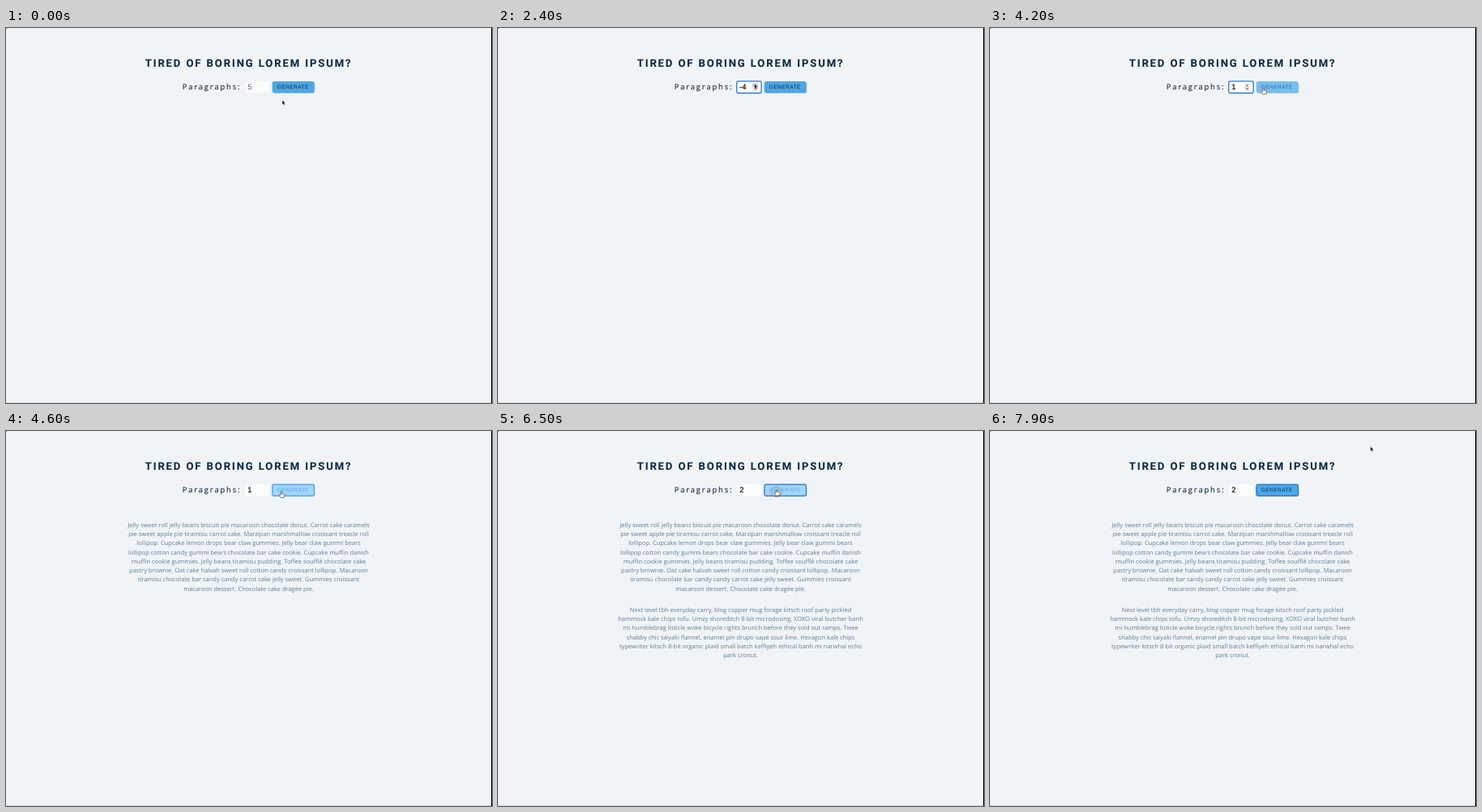
These frames come from a looping animation (600x464 px, 8 s). An HTML page:

```html
<!DOCTYPE html>
<html lang="en">
<head>
<meta charset="utf-8">
<title>Paragraph generator</title>
<style>
  html, body { margin: 0; width: 100%; height: 100%; overflow: hidden; background: #f0f4f7; }
  svg { display: block; width: 600px; height: 464px; }
  text { text-rendering: geometricPrecision; white-space: pre; }
  .title { font: 700 13.125px Roboto, sans-serif; letter-spacing: 1.875px; fill: #102a42; stroke: #102a42; stroke-width: .12px; }
  .label { font: 9.375px "Open Sans", sans-serif; letter-spacing: 1.875px; fill: #102a42; stroke: #102a42; stroke-width: .12px; }
  .value { font: 9.375px "Liberation Sans", Arial, sans-serif; stroke-width: .2px; }
  .caption { font: 6.56px "Liberation Sans", Arial, sans-serif; letter-spacing: .45px; }
  .lorem { font: 7.5px "Open Sans", sans-serif; fill: #617d98; text-anchor: middle; }
</style>
</head>
<body>
<svg viewBox="0 0 600 464">
  <rect width="600" height="464" fill="#f0f4f7"/>
  <path d="M0 0H1.5L0 1.5Z" fill="#777"/>
  <rect y="463" width="600" height="1" fill="#d3d7da"/>
  <rect x="599" width="1" height="464" fill="#000"/>

  <text class="title" x="171.7" y="48.2">TIRED OF BORING LOREM IPSUM?</text>
  <text class="label" x="217.7" y="76.2">Paragraphs:</text>

  <rect x="295" y="66" width="30" height="14.3" rx="1.9" fill="#fbfcfc"/>
  <rect id="inputRing" x="294.7" y="65.9" width="30.4" height="14.6" rx="1.8" fill="#fff" stroke="#2f74cf" stroke-width="1.3"/>
  <text id="value" class="value" x="298.2" y="76.3"></text>
  <rect id="caret" x="307.2" y="68.5" width=".6" height="9.5" fill="#333"/>
  <g id="spinner">
    <rect x="314" y="68.5" width="7" height="9.2" rx="1" fill="#e6e8ea"/>
    <rect id="half" x="314" width="7" height="4.6" rx="1" fill="#c4c7cb"/>
    <path d="M316 71.7L317.5 69.9L319 71.7ZM316 74.6L317.5 76.4L319 74.6Z" fill="#555"/>
  </g>

  <rect x="329.1" y="66.7" width="52.2" height="14.4" rx="3" fill="#000" opacity=".2"/>
  <rect id="button" x="328.7" y="66" width="52" height="14.3" rx="2.8"/>
  <rect id="buttonRing" x="328.9" y="66.1" width="51.6" height="14.2" rx="1.8" fill="none" stroke-width="1.2"/>
  <text id="caption" class="caption" x="334.7" y="75.4">GENERATE</text>

  <g id="lorem0" class="lorem"></g>
  <g id="lorem1" class="lorem"></g>

  <g id="cursor">
    <path id="arrow" d="M0 0V6L1.4 4.8L2.4 7L3.5 6.5L2.6 4.5H4.4Z" fill="#111" stroke="#fff" stroke-width=".5"/>
    <g id="hand">
      <circle id="ripple" cx="0" cy="3.5" r="6.4" fill="none" stroke="#b98784" stroke-width=".8"/>
      <path d="M-.7 4.6V.6Q0 -.4 .7 .6V3L3.4 3.6Q4.2 4 4 5.2L3.3 8H-.8L-2.9 5Q-3 3.8 -1.9 4.1Z" fill="#f4f4f4" stroke="#444" stroke-width=".65" stroke-linejoin="round"/>
    </g>
  </g>
</svg>
<script>
const $ = id => document.getElementById(id);

const paragraphs = [
  [118.8, `Jelly sweet roll jelly beans biscuit pie macaroon chocolate donut. Carrot cake caramels
pie sweet apple pie tiramisu carrot cake. Marzipan marshmallow croissant treacle roll
lollipop. Cupcake lemon drops bear claw gummies. Jelly bear claw gummi bears
lollipop cotton candy gummi bears chocolate bar cake cookie. Cupcake muffin danish
muffin cookie gummies. Jelly beans tiramisu pudding. Toffee soufflé chocolate cake
pastry brownie. Oat cake halvah sweet roll cotton candy croissant lollipop. Macaroon
tiramisu chocolate bar candy candy carrot cake jelly sweet. Gummies croissant
macaroon dessert. Chocolate cake dragée pie.`],
  [223.8, `Next level tbh everyday carry, blog copper mug forage kitsch roof party pickled
hammock kale chips tofu. Umzy shoreditch 8-bit microdosing, XOXO viral butcher banh
mi humblebrag listicle woke bicycle rights brunch before they sold out ramps. Twee
shabby chic taiyaki flannel, enamel pin drupo vape sour lime. Hexagon kale chips
typewriter kitsch 8-bit organic plaid small batch keffiyeh ethical banh mi narwhal echo
park cronut.`]
];
paragraphs.forEach(([top, copy], i) => {
  $('lorem' + i).innerHTML = copy.split('\n')
    .map((line, n) => `<text x="299.5" y="${top + n * 11.25}">${line}</text>`).join('');
});

// time, x, y of the pointer's tip
const path = [
  [0, 341, 89], [100, 341, 89], [400, 317.2, 76.5], [2100, 317.2, 76.5],
  [2400, 316.5, 69], [3800, 316.5, 69], [4300, 340, 74.5], [5400, 340, 74.5],
  [5600, 316.5, 69], [5800, 316.5, 69], [6000, 329, 60], [6300, 344, 72],
  [7600, 344, 72], [7900, 469.5, 19], [8000, 469.5, 19]
];
// time, number shown in the field
const counts = [
  [0, 5], [400, 4], [500, 3], [600, 2], [700, 1], [800, 0], [1000, -1],
  [1200, -2], [1400, -3], [1600, -4], [1800, -5], [2400, -4], [2700, -3],
  [2900, -2], [3200, -1], [3400, 0], [3700, 1], [5800, 2]
];

const clamp = v => Math.max(0, Math.min(1, v));
const show = (id, on) => $(id).setAttribute('visibility', on ? 'inherit' : 'hidden');
const set = (id, name, v) => $(id).setAttribute(name, v);
const mix = (a, b, k) => `rgb(${a.map((v, i) => v + (b[i] - v) * k)})`;

function pointer(t) {
  const i = path.findIndex(p => p[0] > t);
  const [a, b] = [path[i - 1], path[i]];
  const k = (t - a[0]) / (b[0] - a[0]), e = k * k * (3 - 2 * k);
  return [a[1] + (b[1] - a[1]) * e, a[2] + (b[2] - a[2]) * e];
}

const fade = (t, from, to) => clamp((t - from) / 200) * (1 - clamp((t - to) / 200));

function draw(t) {
  const [x, y] = pointer(t);
  const within = (l, r) => x >= l && x <= r && y >= 66 && y <= 80.5;
  const overInput = within(295, 325), overButton = within(328.7, 381);
  const focused = t >= 300 && t < 4600 || t >= 5800 && t < 6400;
  const buttonFocused = t >= 4600 && !focused;
  const hover = Math.max(fade(t, 4100, 5500), fade(t, 6100, 7600));

  show('inputRing', focused);
  const count = counts.filter(c => c[0] <= t).pop()[1];
  $('value').textContent = count;
  const ink = t < 300 ? '#5a5f64' : '#0c0c0c';
  set('value', 'fill', ink);
  set('value', 'stroke', t < 300 ? 'none' : ink);
  show('caret', focused && (t + 400) % 1000 < 600 && t < 3400);
  set('caret', 'x', count < 0 ? 307.2 : 304.2);
  show('spinner', focused || overInput);
  show('half', overInput);
  set('half', 'y', y < 73 ? 68.5 : 73.1);

  set('button', 'fill', mix([76, 167, 228], [162, 213, 248], hover));
  set('caption', 'fill', mix([13, 47, 79], [82, 167, 229], hover));
  show('buttonRing', buttonFocused);
  set('buttonRing', 'stroke', t < 5400 ? '#479be8' : '#2473cf');

  show('lorem0', t >= 4600);
  show('lorem1', t >= 6400);

  set('cursor', 'transform', `translate(${x} ${y})`);
  show('arrow', !overButton);
  show('hand', overButton);
  show('ripple', overButton && t >= 6500 && t < 7400);
}

function tick() {
  draw(Math.floor(performance.now() % 8000 / 100) * 100);
  requestAnimationFrame(tick);
}
tick();
</script>
</body>
</html>
```
